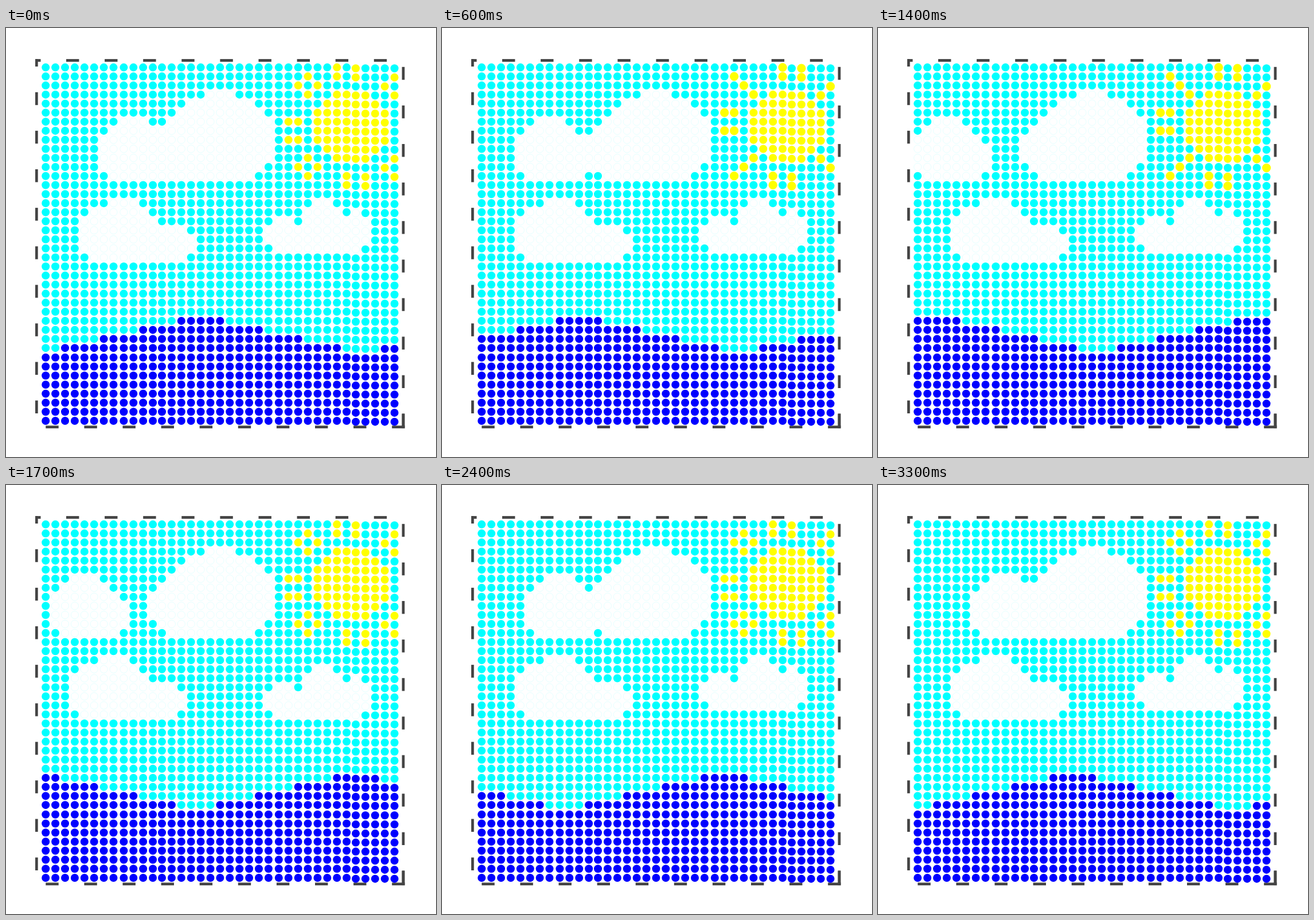
An HTML page with a canvas that plays this animation: 750 by 747 pixels, repeating every 3400 ms.

```html
<!DOCTYPE html>
<html lang="en">
<head>
<meta charset="utf-8">
<title>Dotted seascape</title>
<style>
  html, body { margin: 0; width: 100%; height: 100%; overflow: hidden; background: #fff; }
  canvas { display: block; }
</style>
</head>
<body>
<canvas id="stage" width="750" height="747"></canvas>
<script>
const ctx = document.getElementById('stage').getContext('2d');
const COLS = 37, ROWS = 40, STEP_MS = 100, STEPS = 34, WAVE = 33;

// A cloud is a union of puffs (column, row, radius) cut off below its base row.
const bigCloud = { base: 12, puffs: [[18, 8, 5.43], [15, 9, 4.2]] };
const driftCloud = { base: 12, puffs: [[3, 9, 3.3], [3.5, 10, 3.7]] };
const leftCloud = { base: 21, puffs: [[8, 18, 3.3], [7, 18.5, 3.5], [10, 20, 1.5], [13, 19.5, 2.3]] };
const rightCloud = { base: 20, puffs: [[24.5, 18.5, 1.7], [28.5, 17, 2.24], [28, 19, 2.26],
  [32, 17, 1.1], [31.5, 18.5, 1.7]] };

function covers({ base, puffs }, c, r) {
  return r <= base && puffs.some(([x, y, size]) =>
    (c - x) ** 2 + 1.05 * (r - y) ** 2 <= size ** 2);
}

function inCloud(c, r, k) {
  const sway = Math.round(-Math.sin(k * Math.PI / 2));
  const drift = Math.min(6, Math.abs(7 - (k >> 1)));
  return covers(bigCloud, c, r) || covers(driftCloud, c - drift, r) ||
    covers(leftCloud, c - sway, r) || covers(rightCloud, c, r + sway);
}

function inWave(c, r, k) {
  const u = (c + k) % WAVE;
  return r >= 32 || r >= 28 && Math.abs(u - 16) <= 2 + 4 * (r - 28);
}

// u and v are distances from the middle of the sun.
const inDisc = (u, v) => Math.max(u, v) < 4 && u + v < 5.5;

function inRays(c, r, u, v, turned) {
  if (u < 2) return v > 5 && v < 7 && (c + (r > 6) + turned) % 2 === 0;
  if (v < 2) return (c === 25 || c === 26) && (r + turned) % 2 === 0;
  return turned ? u === v && u >= 3.5 && u <= 5.5
                : Math.abs(u - 4.5) + Math.abs(v - 4.5) === 1;
}

function dot(c, r, k) {
  // Some strips of the grid sit slightly off the even spacing.
  const x = 69.2 + 16.9 * c + (c >> 2 === 2 || c >> 3 === 3 ? 1 : 0);
  const y = 68.6 + 15.76 * r + (r > 31 ? 0.8 : 0) + (c > 31 ? 1.6 : 0);
  const u = Math.abs(c - 31.5), v = Math.abs(r - 6.5);
  const turned = k % 4 > 1 ? 1 : 0;
  let radius = 7, color = '#0ff';
  ctx.beginPath();
  if (inCloud(c, r, k)) {
    ctx.arc(x, y, 6.6, 0, 7);
    ctx.strokeStyle = '#dff';
    ctx.lineWidth = 0.8;
    ctx.stroke();
    return;
  }
  if (inWave(c, r, k)) color = '#00f';
  else if (inDisc(u, v)) color = '#ff0';
  else if (inRays(c, r, u, v, turned)) {
    color = '#ff0';
    if (turned) radius = 7.6;
  }
  ctx.arc(x, y, radius, 0, 7);
  ctx.fillStyle = color;
  ctx.fill();
}

function border() {
  const long = 22.4, thick = 4.7;
  ctx.fillStyle = '#444';
  for (let i = 0; i < 10; i++) {
    const d = 67.1 * i;
    ctx.fillRect(69.3 + d, 692.4, long, thick);
    ctx.fillRect(690.6, 67.8 + d, thick, long);
    if (i === 9) break;
    ctx.fillRect(105 + d, 54.1, long, thick);
    ctx.fillRect(51, 111.8 + d, thick, long);
  }
  ctx.fillRect(51, 54.1, 9.5, thick);
  ctx.fillRect(51, 54.1, thick, 13);
  ctx.fillRect(690.6, 671.5, thick, 25.6);
}

function draw(step) {
  const k = step % WAVE;
  ctx.fillStyle = '#fff';
  ctx.fillRect(0, 0, 750, 747);
  border();
  for (let r = 0; r < ROWS; r++)
    for (let c = 0; c < COLS; c++) dot(c, r, k);
}

const start = performance.now();
let shown = -1;
function tick() {
  const step = Math.floor((performance.now() - start) / STEP_MS) % STEPS;
  if (step !== shown) draw(shown = step);
  requestAnimationFrame(tick);
}
tick();
</script>
</body>
</html>
```
